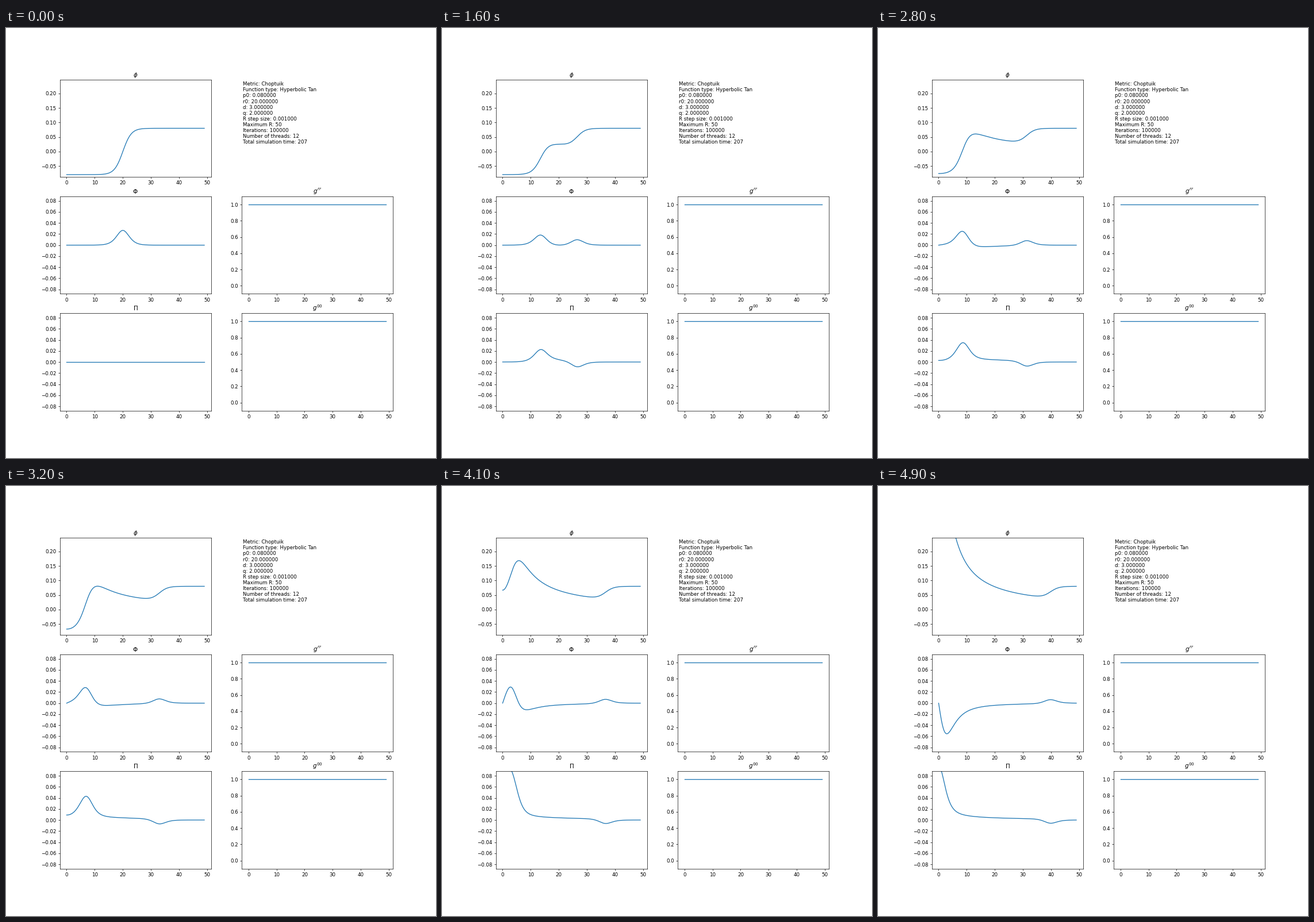
Write a matplotlib script that moves like this. It is 748 px wide and 748 px high and loops after 5 s.

```python
import numpy as np
import matplotlib.pyplot as plt
from matplotlib.animation import FuncAnimation

plt.rcParams["font.family"] = "DejaVu Sans"

SIZE = 748
FRAMES, INTERVAL = 50, 100
TIME_STEP = 0.4
P0, R0, D = 0.08, 20.0, 3.0

INFO = [
    "Metric: Choptuik",
    "Function type: Hyperbolic Tan",
    f"p0: {P0:.6f}",
    f"r0: {R0:.6f}",
    f"d: {D:.6f}",
    "q: 2.000000",
    "R step size: 0.001000",
    "Maximum R: 50",
    "Iterations: 100000",
    "Number of threads: 12",
    "Total simulation time: 207",
]

radius = np.linspace(0, 49, 491)
safe_radius = np.maximum(radius, 1e-4)


def pulse(x):
    """Odd extension of r * phi(r, 0)."""
    return P0 * x * np.tanh((np.abs(x) - R0) / D)


def pulse_slope(x):
    s = np.tanh((np.abs(x) - R0) / D)
    return P0 * (s + np.abs(x) / D * (1 - s**2))


def fields(t):
    """Spherical wave: phi, its radial derivative and its time derivative."""
    r = safe_radius
    phi = (pulse(r + t) + pulse(r - t)) / (2 * r)
    inward, outward = pulse_slope(r + t), pulse_slope(r - t)
    return phi, ((inward + outward) / 2 - phi) / r, (inward - outward) / (2 * r)


fig = plt.figure(figsize=(12, 12), dpi=SIZE / 12, facecolor="white")


def panel(position, title, ylim, yticks):
    ax = fig.add_subplot(3, 2, position)
    ax.set_title(title)
    line, = ax.plot(radius, np.ones_like(radius), color="#1f77b4", lw=1.5)
    ax.set_xticks(range(0, 51, 10))
    ax.set_yticks(yticks)
    ax.set_xlim(-2.45, 51.45)
    ax.set_ylim(*ylim)
    return line


small_ticks = np.arange(-4, 5) * 0.02
unit_ticks = np.arange(6) * 0.2
waves = [
    panel(1, r"$\phi$", (-1.1 * P0, 3.1 * P0), np.arange(-1, 5) * 0.05),
    panel(3, r"$\Phi$", (-1.1 * P0, 1.1 * P0), small_ticks),
    panel(5, r"$\Pi$", (-1.1 * P0, 1.1 * P0), small_ticks),
]
panel(4, r"$g^{rr}$", (-0.1, 1.1), unit_ticks)
panel(6, r"$g^{00}$", (-0.1, 1.1), unit_ticks)

for row, text in enumerate(INFO):
    fig.text(411.6 / SIZE, 1 - (100.3 + 10.1 * row) / SIZE, text,
             fontsize=10, va="baseline")


def update(frame):
    for line, values in zip(waves, fields(frame * TIME_STEP)):
        line.set_data(radius, values)
    return waves


anim = FuncAnimation(fig, update, frames=FRAMES, interval=INTERVAL,
                     repeat=True, repeat_delay=0)
plt.show()
```
